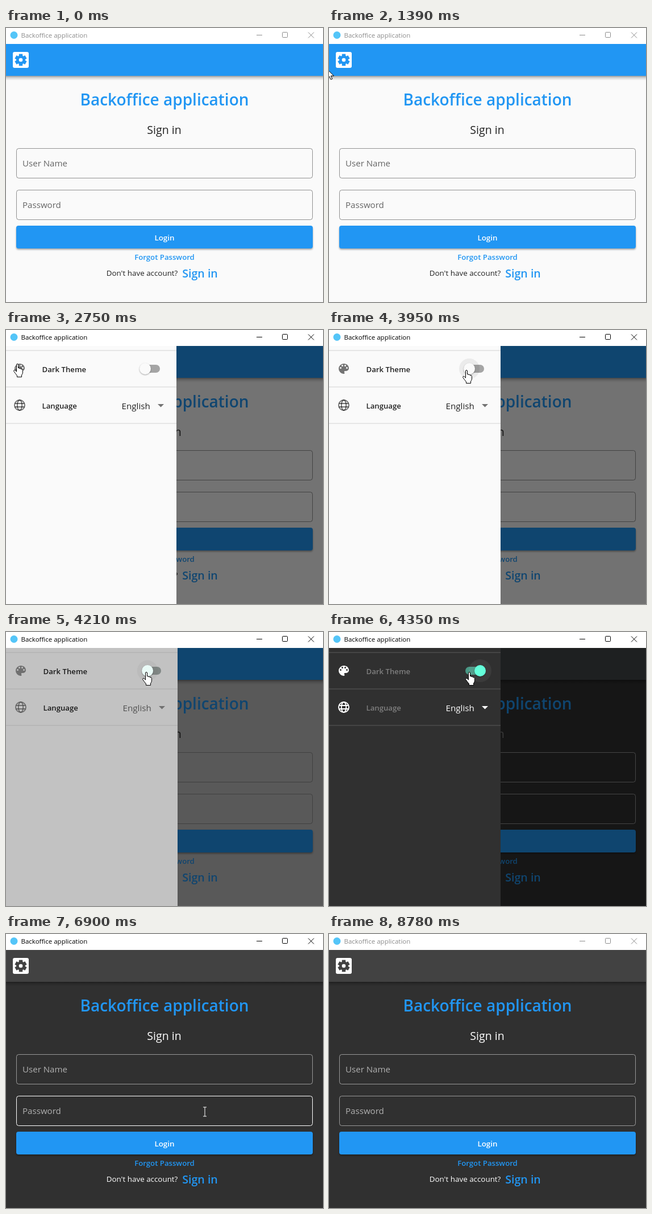
Write an HTML page that moves like this. It is 558 px wide and 481 px high and loops after 8900 ms.

```html
<!DOCTYPE html>
<html lang="en">
<head>
<meta charset="utf-8">
<title>Backoffice application</title>
<style>
  html, body { margin: 0; width: 100%; height: 100%; overflow: hidden; }
  svg { display: block; width: 558px; height: 481px; cursor: default; }
  text { font-family: "Open Sans", "Noto Sans", sans-serif; font-variant-ligatures: none; fill: var(--text); white-space: pre; }
  .mid { text-anchor: middle; }
  .bold { font-weight: 600; }
  .blue { fill: #2196f3; }
  .hint { fill: var(--hint); font-size: 15.1px; }
  .label { font-size: 13.2px; }
  .now { fill: var(--now); }
  .icon { fill: var(--icon); }
  .field { fill: none; stroke: var(--border); }
  .field.hover { stroke: var(--text); }
  #login { fill: #2196f3; filter: drop-shadow(0 2px 1.5px rgba(0, 0, 0, .35)); }
  #login.hover { fill: #33a0f5; }
  .chrome { fill: none; stroke: var(--chrome); }
</style>
</head>
<body>
<svg id="stage" viewBox="0 0 558 481">
  <defs>
    <linearGradient id="fade" x2="0" y2="1">
      <stop offset="0" stop-opacity=".38"/>
      <stop offset=".4" stop-opacity=".16"/>
      <stop offset="1" stop-opacity="0"/>
    </linearGradient>
  </defs>

  <!-- sign-in page -->
  <rect width="558" height="481" fill="var(--bg)"/>
  <rect y="84" width="558" height="8" fill="url(#fade)"/>
  <rect y="28" width="558" height="56" fill="var(--bar)"/>
  <rect x="12" y="42" width="28" height="28" rx="3" fill="#fff"/>
  <g transform="translate(26 56)" stroke="var(--bar)" stroke-width="6.4">
    <path d="M0-10.4V10.4"/>
    <path d="M0-10.4V10.4" transform="rotate(60)"/>
    <path d="M0-10.4V10.4" transform="rotate(120)"/>
    <circle r="5.6" fill="#fff" stroke-width="4.6"/>
  </g>
  <circle id="tap" cx="26" cy="56" r="20" fill-opacity=".08"/>
  <text class="mid bold blue" x="279" y="136" font-size="28">Backoffice application</text>
  <text class="mid" x="278.5" y="186" font-size="19.5">Sign in</text>
  <rect class="field" x="18.5" y="211.5" width="521" height="52" rx="4"/>
  <text class="hint" x="29" y="243">User Name</text>
  <rect class="field" x="18.5" y="284.5" width="521" height="52" rx="4"/>
  <text class="hint" x="29" y="316">Password</text>
  <rect id="login" x="18" y="347" width="522" height="40" rx="4"/>
  <text class="mid bold" x="279" y="373" font-size="13.4" style="fill:#fff">Login</text>
  <text class="mid bold blue" x="279" y="407" font-size="13.2">Forgot Password</text>
  <text class="mid" x="239.5" y="435" font-size="13.4">Don't have account?</text>
  <text class="mid bold blue" x="341.5" y="438" font-size="19.6">Sign in</text>

  <!-- drawer -->
  <rect id="scrim" y="28" width="558" height="453"/>
  <g id="drawer">
    <rect x="-2" y="28" width="304" height="453" fill="var(--bg)"/>
    <path d="M-2 36H302M-2 100H302M-2 164H302" stroke="var(--line)" stroke-width="2"/>
    <path id="palette" class="icon" transform="translate(14 56)" fill-rule="evenodd"/>
    <g transform="translate(26 132)" fill="none" stroke="var(--icon)" stroke-width="1.9">
      <circle r="9"/>
      <ellipse rx="4.2" ry="9"/>
      <path d="M-8.4-3H8.4M-8.4 3H8.4"/>
    </g>
    <text class="label bold" x="65.5" y="74">Dark Theme</text>
    <text class="label bold" x="65.5" y="138">Language</text>
    <text class="now" x="205.5" y="139" font-size="15.2">English</text>
    <path class="icon" d="M269 130H280L274.5 135.5Z"/>
    <rect x="240" y="61" width="33" height="14" rx="7" fill="var(--track)"/>
    <circle id="ripple" cy="68" fill="var(--ripple)"/>
    <circle id="thumb" cy="68" r="10" fill="var(--thumb)" style="filter:drop-shadow(0 1px 1px rgba(0,0,0,.35))"/>
  </g>

  <!-- title bar -->
  <rect width="558" height="28" fill="#fff"/>
  <circle cx="14" cy="12.5" r="6.5" fill="#54c5f8"/>
  <text x="26.5" y="17" font-size="11.5" style="fill:var(--chrome)">Backoffice application</text>
  <path class="chrome" d="M441 12.5H451M532 7.5L542 17.5M542 7.5L532 17.5"/>
  <rect class="chrome" x="486.5" y="7.5" width="9" height="9" rx="1"/>

  <path id="cursor" fill="#fff" stroke="#000" stroke-linejoin="round"/>
</svg>

<script>
const LOOP = 8900;
const $ = id => document.getElementById(id);
const stage = $('stage');
const fields = document.querySelectorAll('.field');

// The picture only updates in bursts: [first, last, updates]
const bursts = [
  [1390, 1740, 6], [2400, 2470, 2], [2750, 2820, 2], [3360, 4210, 13], [4280, 4560, 5],
  [5160, 5290, 3], [5560, 5560, 1], [5690, 5970, 5], [6570, 6970, 7], [8780, 8780, 1]
];
function snap(t) {
  const burst = bursts.filter(b => b[0] <= t).pop();
  if (!burst) return 0;
  const [a, b, n] = burst;
  if (t >= b) return b;
  const step = (b - a) / (n - 1);
  return a + Math.floor((t - a) / step + .001) * step;
}

const ramp = (t, a, b) => Math.min(1, Math.max(0, (t - a) / (b - a)));
const ease = k => (1 - Math.cos(Math.PI * k)) / 2;
const lerp = (a, b, k) => a + (b - a) * k;
const mix = (a, b, k) => `rgba(${a.map((v, i) => lerp(v, b[i], k).toFixed(3))})`;
const black = a => [0, 0, 0, a];
const white = a => [255, 255, 255, a];
// The point reached when a list is walked between times a and b
const along = (list, t, a, b) => list[Math.round(ramp(t, a, b) * (list.length - 1))];

const shapes = {
  arrow: 'M0 .5V16.5L3.8 13L6.3 18.5L8.8 17.4L6.4 12H11.5Z',
  hand: 'M-1.5 2Q-1.5.5 0 .5T1.5 2V8Q1.6 7.4 2.8 7.5 4 7.6 4 9 4.2 8.1 5.3 8.2 6.5 8.4 6.6 10 7 9.3 8 9.5 9.4 9.8 9.4 11.5V16Q9 18.5 7.5 20V23.5H-.5V21Q-3 18-6.2 13.5-6.7 12-5.5 11.2-4 11-1.5 14Z',
  beam: 'M-3-8H3M0-8V8M-3 8H3'
};

const hole = (x, y) => `M${x - 1.5} ${y}a1.5 1.5 0 1 0 3 0a1.5 1.5 0 1 0-3 0`;
$('palette').setAttribute('d',
  'M12 3a9 9 0 0 0 0 18c.83 0 1.5-.67 1.5-1.5 0-.39-.15-.74-.39-1.01-.23-.26-.38-.61-.38-.99 0-.83.67-1.5 1.5-1.5H16c2.76 0 5-2.24 5-5 0-4.42-4.03-8-9-8z' +
  hole(6.5, 10.5) + hole(9.5, 6.5) + hole(14.5, 6.5) + hole(17.5, 10.5));

const enter = [[-3, 72], [14, 54], [30, 43], [50, 56], [66, 73], [75, 84]];
const leave = [[290, 88], [338, 103], [349.5, 105.5]];

// Returns [shape, x, y] or null while the pointer is outside
function pointer(t) {
  if (t < 1390 || t >= 6970) return null;
  if (t < 2400) {
    const [x, y] = along(enter, t, 1390, 1740);
    return [x > 11 && x < 41 ? 'hand' : 'arrow', x, y];
  }
  if (t < 2470) return ['hand', 32, 65];
  if (t < 3360) return ['hand', 20, 59];
  if (t < 5160) {
    const k = ease(ramp(t, 3290, 3990)), x = lerp(20, 247, k);
    return [x > 236 ? 'hand' : 'arrow', x, lerp(59, 70, k)];
  }
  if (t < 6570) return ['arrow', ...along(leave, t, 5160, 5290)];
  const y = 106 + 276 * ramp(t, 6503, 6903) ** 1.6;
  const inField = y > 211 && y < 264 || y > 284 && y < 337;
  return [inField ? 'beam' : y > 347 ? 'hand' : 'arrow', 349.5, y];
}

function draw(t) {
  const theme = ramp(t, 4157, 4348);
  const late = ramp(t, 4210, 4480);
  const flip = ramp(t, 4193, 4350);
  const open = t < 2750 ? 0 : t < 2820 ? 302 / 304 : 1 - ease(ramp(t, 5520, 5950));

  const colors = {
    bg: mix([250, 250, 250, 1], [48, 48, 48, 1], theme),
    bar: mix([33, 150, 243, 1], [66, 66, 66, 1], ramp(t, 4210, 4355)),
    text: mix(black(.87), white(1), late),
    now: mix(black(.87), white(1), theme),
    hint: mix(black(.6), white(.62), late),
    border: mix(black(.42), white(.5), theme),
    icon: mix(black(.54), white(1), theme),
    line: mix(black(.08), white(.1), theme),
    track: mix(black(.34), [100, 255, 218, .5], flip),
    thumb: mix([250, 250, 250, 1], [100, 255, 218, 1], flip),
    ripple: mix(black(.06), white(.05), theme),
    chrome: t >= 2470 && t < 8780 ? '#000' : '#8c8c8c'
  };
  for (const name in colors) stage.style.setProperty('--' + name, colors[name]);

  $('scrim').setAttribute('opacity', .54 * open);
  $('drawer').setAttribute('transform', `translate(${Math.round(304 * (open - 1))})`);
  $('drawer').setAttribute('visibility', open ? 'visible' : 'hidden');
  $('tap').setAttribute('visibility', t >= 2470 && t < 2750 ? 'visible' : 'hidden');

  const x = lerp(247, 266, flip);
  $('thumb').setAttribute('cx', x);
  $('ripple').setAttribute('cx', x);
  $('ripple').setAttribute('r', t >= 3880 && t < 5160 ? lerp(18, 20, flip) : 0);

  const p = pointer(t);
  $('cursor').setAttribute('visibility', p ? 'visible' : 'hidden');
  if (p) {
    $('cursor').setAttribute('d', shapes[p[0]]);
    $('cursor').setAttribute('stroke', p[0] === 'beam' ? '#fff' : '#000');
    $('cursor').setAttribute('transform', `translate(${Math.round(p[1])} ${Math.round(p[2])})`);
  }
  const y = p && t >= 6570 ? p[2] : 0;
  fields[0].classList.toggle('hover', y > 211 && y < 264);
  fields[1].classList.toggle('hover', y > 284 && y < 337);
  $('login').classList.toggle('hover', y > 347);
}

const start = performance.now();
let last = -1;
function tick() {
  const t = snap((performance.now() - start) % LOOP);
  if (t !== last) draw(last = t);
  requestAnimationFrame(tick);
}
tick();
</script>
</body>
</html>
```
